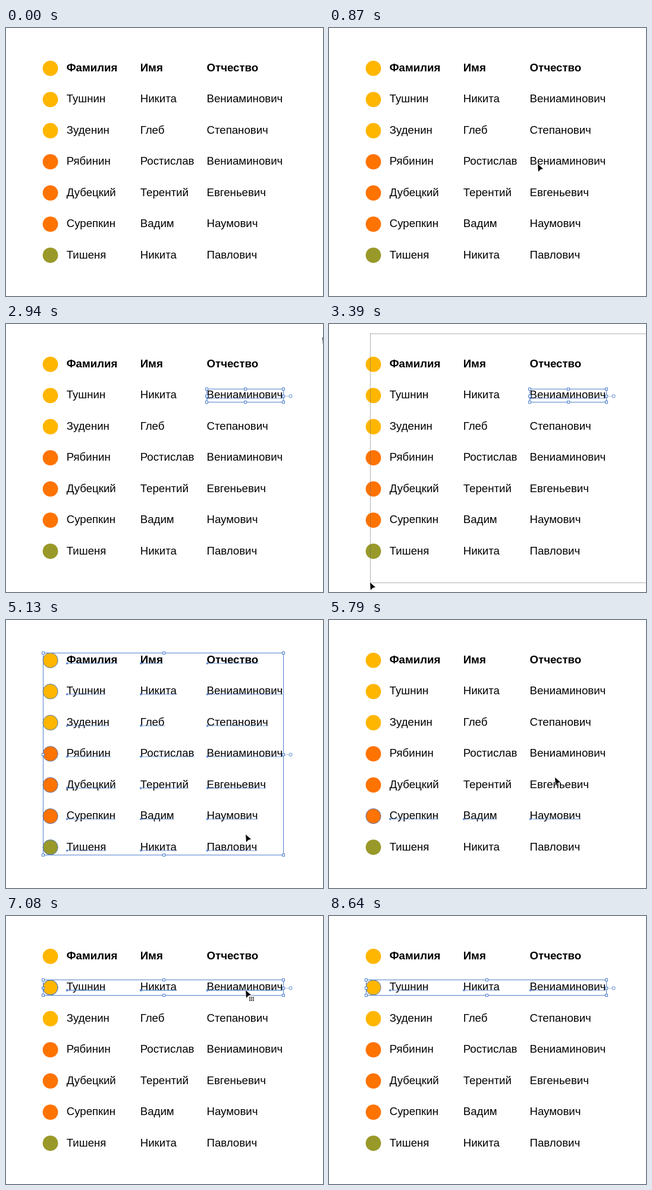
Animation of 533x451 px, one loop 8.73 s. Source, as an HTML page with a canvas:

```html
<!DOCTYPE html>
<html lang="ru">
<head>
<meta charset="utf-8">
<style>
html, body { margin: 0; width: 100%; height: 100%; overflow: hidden; background: #fff; }
canvas { display: block; width: 533px; height: 451px; }
</style>
</head>
<body>
<canvas id="stage" width="533" height="451"></canvas>
<script>
const ctx = document.getElementById('stage').getContext('2d');
const LOOP = 8730, STEP = 30, HOVER_LAG = 60;
const BLUE = '#5482cd', FAMILY = '18.65px "Liberation Sans", Arial, sans-serif';
const YELLOW = '#ffb600', ORANGE = '#ff7300', OLIVE = '#99992a';
const COLUMNS = [101.7, 225.7, 337.5];
const DOT = { x: 74.6, r: 12.9 };

const rows = [
  [YELLOW, 'Фамилия', 'Имя', 'Отчество'],
  [YELLOW, 'Тушнин', 'Никита', 'Вениаминович'],
  [YELLOW, 'Зуденин', 'Глеб', 'Степанович'],
  [ORANGE, 'Рябинин', 'Ростислав', 'Вениаминович'],
  [ORANGE, 'Дубецкий', 'Терентий', 'Евгеньевич'],
  [ORANGE, 'Сурепкин', 'Вадим', 'Наумович'],
  [OLIVE, 'Тишеня', 'Никита', 'Павлович']
].map(([color, ...words], i) => ({ color, words, y: 67.9 + 52.43 * i, base: 72.8 + 52.5 * i }));

const fontOf = row => (row === rows[0] ? 'bold ' : '') + FAMILY;
for (const row of rows) {
  ctx.font = fontOf(row);
  row.widths = row.words.map(word => ctx.measureText(word).width);
}

// Pointer path: time, x, y
const path = [
  [30, 64, 56], [400, 76, 384], [650, 130, 329], [900, 360, 225], [1200, 250, 383],
  [1500, 280, 66], [1770, 404, 119], [2760, 404, 119], [2970, 540, 16], [3030, 540, 16],
  [3390, 69, 435], [3640, 69, 435], [4050, 403, 361], [5150, 403, 361], [5300, 403, 411],
  [5360, 403, 411], [5670, 384, 328], [5750, 384, 328], [5790, 380, 265], [5950, 390, 115],
  [6150, 250, 225], [6400, 120, 325], [6660, 140, 380], [7000, 403, 125], [7170, 403, 125],
  [7530, 380, 384], [7850, 260, 277], [8250, 400, 125]
];
const TIMES = { pick: 1815, drag: 3015, release: 3600, clear: 5330, pickRow: 7020, hide: 8400 };

function pointerAt(t) {
  const next = path.findIndex(key => key[0] > t);
  if (next < 0) return path[path.length - 1].slice(1);
  if (next === 0) return path[0].slice(1);
  const [t0, x0, y0] = path[next - 1], [t1, x1, y1] = path[next];
  const k = (t - t0) / (t1 - t0), e = k * k * (3 - 2 * k);
  return [x0 + (x1 - x0) * e, y0 + (y1 - y0) * e];
}

// Returns the row and item under a point; item 0 is the dot, 1..3 are words.
function hitTest([x, y]) {
  const row = rows.find(r => Math.abs(y - r.y) < 13);
  if (!row) return null;
  if (Math.hypot(x - DOT.x, y - row.y) < DOT.r) return { row, item: 0 };
  const col = COLUMNS.findIndex((left, i) => x >= left && x <= left + row.widths[i]);
  return col < 0 ? null : { row, item: col + 1 };
}

function circle(x, y, r) {
  ctx.beginPath();
  ctx.arc(x, y, r, 0, Math.PI * 2);
}

function outlineItem(row, item) {
  ctx.strokeStyle = ctx.fillStyle = BLUE;
  ctx.lineWidth = 1;
  if (item === 0) {
    circle(DOT.x, row.y, DOT.r - 0.4);
    ctx.stroke();
    return;
  }
  const x = COLUMNS[item - 1], y = Math.round(row.base) - 0.5;
  ctx.globalAlpha = 0.8;
  ctx.fillRect(x, y, row.widths[item - 1], 1);
  ctx.globalAlpha = 1;
  ctx.fillRect(x - 0.5, y - 1, 3, 3);
}

const outlineRow = row => [0, 1, 2, 3].forEach(item => outlineItem(row, item));

function selectionBox(left, top, right, bottom) {
  const midX = Math.round((left + right) / 2) + 0.5, midY = Math.round((top + bottom) / 2) + 0.5;
  ctx.strokeStyle = BLUE;
  ctx.fillStyle = '#fff';
  ctx.lineWidth = 1;
  ctx.strokeRect(left, top, right - left, bottom - top);
  for (const x of [left, midX, right]) for (const y of [top, midY, bottom]) {
    if (x === midX && y === midY) continue;
    ctx.fillRect(x - 2, y - 2, 4, 4);
    ctx.strokeRect(x - 2, y - 2, 4, 4);
  }
  ctx.setLineDash([1, 1]);
  ctx.beginPath();
  ctx.moveTo(right + 3, midY);
  ctx.lineTo(right + 9, midY);
  ctx.stroke();
  ctx.setLineDash([]);
  circle(right + 12, midY, 2.6);
  ctx.fill();
  ctx.stroke();
}

function marquee([x, y]) {
  ctx.strokeStyle = '#666';
  ctx.lineWidth = 1;
  ctx.setLineDash([1, 1]);
  const left = Math.round(x) + 0.5, bottom = Math.round(y) + 0.5;
  ctx.strokeRect(left, 16.5, 540 - left, bottom - 16.5);
  ctx.setLineDash([]);
}

function pointer([x, y], withGrid) {
  ctx.save();
  ctx.translate(Math.round(x), Math.round(y));
  ctx.beginPath();
  [[0, 0], [9, 8], [4.6, 8.9], [1, 13]].forEach(p => ctx.lineTo(...p));
  ctx.closePath();
  ctx.strokeStyle = '#fff';
  ctx.lineWidth = 1.2;
  ctx.stroke();
  ctx.fillStyle = '#000';
  ctx.fill();
  if (withGrid) {
    for (let i = 0; i < 9; i++) ctx.fillRect(6 + (i % 3) * 3, 11 + Math.floor(i / 3) * 2.7, 1.8, 1.6);
  }
  ctx.restore();
}

function table() {
  ctx.fillStyle = '#fff';
  ctx.fillRect(0, 0, 533, 451);
  for (const row of rows) {
    ctx.fillStyle = row.color;
    circle(DOT.x, row.y, DOT.r);
    ctx.fill();
    ctx.fillStyle = '#000';
    ctx.font = fontOf(row);
    row.words.forEach((word, i) => ctx.fillText(word, COLUMNS[i], row.base));
  }
}

function draw(t) {
  table();
  const { pick, drag, release, clear, pickRow, hide } = TIMES;
  const grouped = t >= clear, visible = t >= 30 && t < hide;
  const pos = pointerAt(t), dragging = t >= drag && t < release;

  if (t >= pick && t < release) {
    outlineItem(rows[1], 3);
    selectionBox(337.5, 109.5, 466.5, 131.5);
  } else if (t >= release && t < clear) {
    rows.forEach(outlineRow);
    selectionBox(62.5, 55.5, 466.5, 395.5);
  } else if (t >= pickRow) {
    outlineRow(rows[1]);
    selectionBox(62.5, 107.5, 466.5, 133.5);
  }

  const hover = visible && !dragging && hitTest(pointerAt(t - HOVER_LAG));
  if (hover && !(t >= release && t < clear)) {
    if (grouped) outlineRow(hover.row);
    else outlineItem(hover.row, hover.item);
  }

  if (dragging) marquee(pos);
  if (visible) {
    const under = hitTest(pos);
    const onSelected = under && under.row === rows[1] &&
      (t >= pickRow || (t >= pick && t < drag && under.item === 3));
    pointer(pos, onSelected);
  }
}

const start = performance.now();
function tick() {
  const t = (performance.now() - start) % LOOP;
  draw(Math.floor(t / STEP) * STEP);
  requestAnimationFrame(tick);
}
tick();
</script>
</body>
</html>
```
